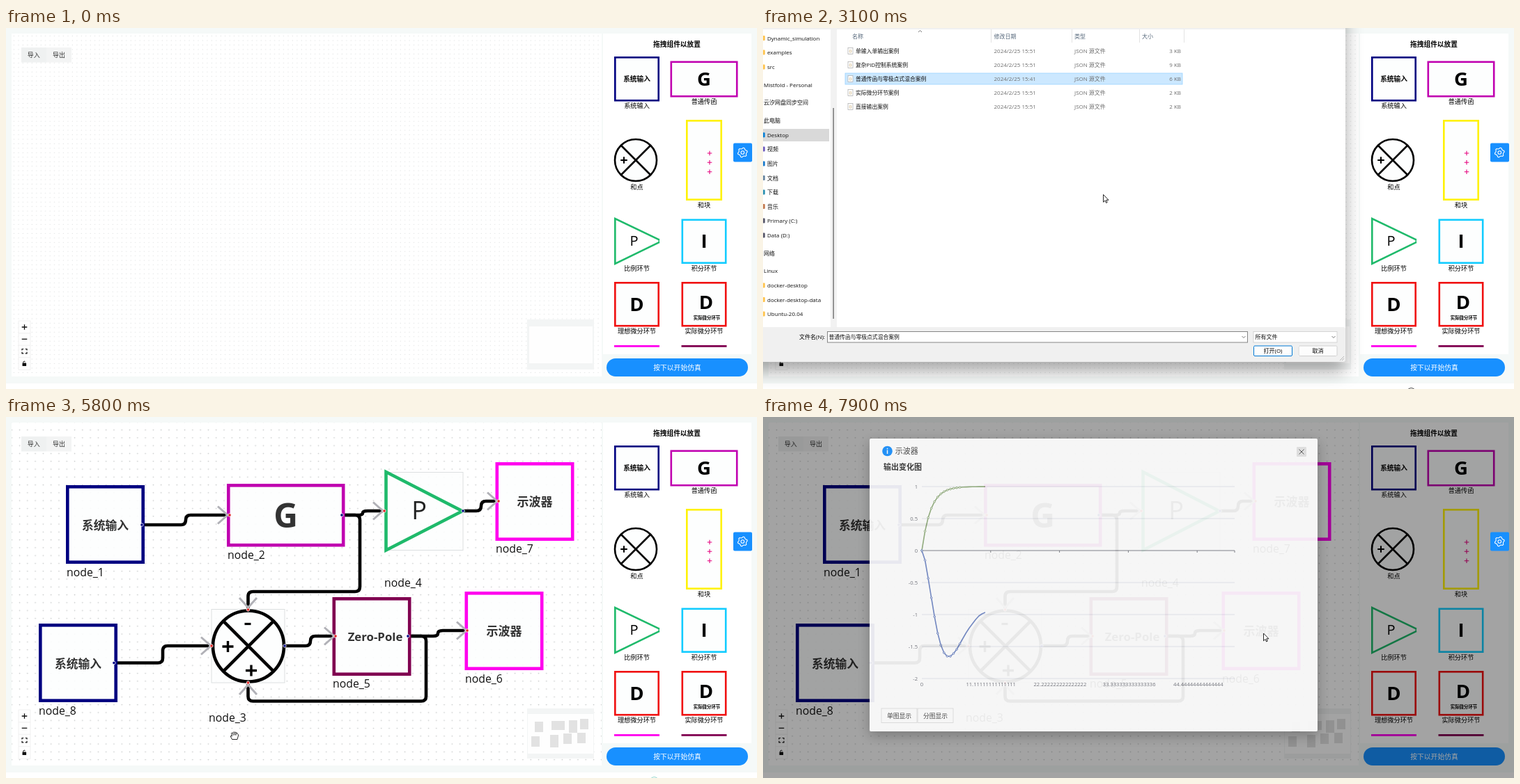
An HTML page for the animation above (8 s loop, 1078 by 519 pixels).

```html
<!DOCTYPE html>
<html lang="zh">
<head>
<meta charset="utf-8">
<style>
  html, body { margin: 0; width: 100%; height: 100%; overflow: hidden; background: #fff; }
  svg { display: block; font-family: "Open Sans", "Noto Sans CJK SC", "Noto Sans CJK", sans-serif; }
</style>
</head>
<body>
<svg id="stage" width="1078" height="519" viewBox="0 0 1078 519"></svg>
<script>
const LOOP = 8000, STEP = 100, FIT_AT = 5500, FIT_ZOOM = 1.75;
const NAVY = '#000080', PURPLE = '#c000b0', GREEN = '#1fba6b', PINK = '#ff00ee', PLUM = '#800050', BLUE = '#1890ff';

// Drawing helpers
const rect = (x, y, w, h, fill = 'none', more = '') =>
  `<rect x="${x}" y="${y}" width="${w}" height="${h}" fill="${fill}" ${more}/>`;
const path = (d, stroke, width = 1, more = '') =>
  `<path d="${d}" fill="none" stroke="${stroke}" stroke-width="${width}" ${more}/>`;
const circle = (x, y, r, fill, more = '') => `<circle cx="${x}" cy="${y}" r="${r}" fill="${fill}" ${more}/>`;
const text = (x, y, s, size, { fill = '#000', bold, anchor = 'middle' } = {}) =>
  `<text x="${x}" y="${y}" font-size="${size}" fill="${fill}" text-anchor="${anchor}"${bold ? ' font-weight="700"' : ''}>${s}</text>`;
const left = (x, y, s, size = 8, fill = '#111') => text(x, y, s, size, { fill, anchor: 'start' });
const group = (id, body, more = '') => `<g id="${id}" ${more}>${body}</g>`;
const frame = (x, y, w, h, color, s) =>
  rect(x + s / 2, y + s / 2, w - s, h - s, 'rgba(253,254,254,.9)', `stroke="${color}" stroke-width="${s}"`);
const plus = (x, y, r, color, width) => path(`M${x - r} ${y}h${2 * r}M${x} ${y - r}v${2 * r}`, color, width);
const bold = { bold: true }, inner = { bold: true, fill: '#333' };

function sumPoint(x, y, r, s) {
  const k = r * Math.SQRT1_2;
  return circle(x, y, r, '#fdfefe', `stroke="#000" stroke-width="${s}"`) +
    path(`M${x - k} ${y - k}l${2 * k} ${2 * k}M${x + k} ${y - k}l${-2 * k} ${2 * k}`, '#000', s);
}

function palette() {
  const label = (x, y, s) => text(x, y, s, 9.2);
  return rect(857, 8, 213, 461, '#fff') +
    text(963, 27, '拖拽组件以放置', 9.7, bold) +
    frame(873, 41, 65, 64.5, NAVY, 2.6) + text(905.5, 76.5, '系统输入', 9.7, bold) + label(905.5, 115, '系统输入') +
    frame(953.5, 47.5, 97, 52, PURPLE, 2.6) + text(1002, 83, 'G', 27.5, bold) + label(1002, 108.5, '普通传函') +
    sumPoint(904, 190, 30, 2.6) + plus(887, 190, 4.8, '#000', 2) + label(905.5, 232, '和点') +
    frame(976, 132, 52, 116, '#fff200', 2.6) +
    [180, 193.3, 206.7].map(y => plus(1010, y, 3.3, '#e6007e', 1.1)).join('') + label(1002, 257.5, '和块') +
    path('M938 304.7L874.3 274V339L938 307.8', GREEN, 2.6) + path('M937.3 304.5v4', GREEN, 1.4) +
    text(901.5, 313, 'P', 20) + label(905.5, 348.5, '比例环节') +
    frame(969.5, 274.5, 65, 64.5, '#12ccff', 2.6) + text(1002, 316, 'I', 27.5, bold) + label(1002, 348.5, '积分环节') +
    frame(873, 365, 65, 64.5, '#f01010', 2.6) + text(905.5, 407, 'D', 27.5, bold) + label(905.5, 439, '理想微分环节') +
    frame(969.5, 365, 65, 64.5, '#f01010', 2.6) + text(1005, 404, 'D', 27.5, bold) +
    text(1006, 418.5, '实际微分环节', 6.4, bold) + label(1002, 439, '实际微分环节') +
    rect(873, 456, 65, 2.8, PINK) + rect(969.5, 456, 65, 2.8, PLUM) +
    rect(862, 475, 203, 26, BLUE, 'id="start" rx="13"') +
    text(963.5, 492, '按下以开始仿真', 9.8, { fill: '#fff' });
}

function gear() {
  let d = '';
  for (let i = 0; i < 24; i++) {
    const a = (i + 0.5) * Math.PI / 12, r = i % 4 < 2 ? 6.9 : 5.5;
    d += (i ? 'L' : 'M') + (r * Math.sin(a)).toFixed(2) + ' ' + (-r * Math.cos(a)).toFixed(2);
  }
  return rect(1044, 165.5, 27, 27, BLUE, 'rx="2"') +
    `<g transform="translate(1057.3 179)">${path(d + 'Z', '#fff', 1.1)}${circle(0, 0, 2.3, 'none', 'stroke="#fff" stroke-width="1.1"')}</g>`;
}

// Orthogonal line with rounded corners
function wire(points, r = 7) {
  let d = `M${points[0]}`;
  for (let i = 1; i < points.length - 1; i++) {
    const [p, c, n] = [points[i - 1], points[i], points[i + 1]];
    const toward = q => {
      const len = Math.hypot(q[0] - c[0], q[1] - c[1]), k = Math.min(r, len / 2) / len;
      return [c[0] + (q[0] - c[0]) * k, c[1] + (q[1] - c[1]) * k];
    };
    d += `L${toward(p)}Q${c} ${toward(n)}`;
  }
  return path(d + `L${points[points.length - 1]}`, '#000', 4.6);
}
const step = (x1, y1, mid, y2, x2) => wire([[x1, y1], [mid, y1], [mid, y2], [x2, y2]]);
const arrow = (x, y, turn = 0) =>
  path('M-14 -12.5L0 0L-14 12.5', '#b1b1b7', 3, `transform="translate(${x} ${y}) rotate(${turn})"`);

function diagram() {
  const block = (x, y, w, h, color, s, size, dy) =>
    frame(x, y, w, h, color, 4.6) + text(x + w / 2, y + dy, s, size, inner);
  const ghost = (x, y, w, h) => rect(x, y, w, h, 'rgba(253,254,254,.9)', 'stroke="#dcdfe0"');
  const names = [[87, 228.5], [318, 203.5], [291, 438], [543, 243.5], [469, 389], [659, 381.5], [703, 194.5], [47, 427.5]];
  const dots = (list, color) => list.map(([x, y]) => circle(x, y, 2.2, color, 'stroke="#fff" stroke-width=".8"')).join('');
  return step(197, 155, 258, 141, 318) + step(485, 141, 512, 135, 541) + step(157, 353.5, 225, 329, 294) +
    step(400, 329, 437, 315, 471) + step(581, 315, 620, 307, 661) + step(657, 135, 682, 121, 705) +
    wire([[485, 141], [508, 141], [508, 251], [347.5, 251], [347.5, 275]]) +
    wire([[581, 315], [603, 315], [603, 408.5], [347.5, 408.5], [347.5, 384]]) +
    block(86, 98, 113, 113, NAVY, '系统输入', 16.8, 64) +
    block(317, 96, 169.5, 90.5, PURPLE, 'G', 48, 62.5) +
    ghost(544, 79.5, 112, 112) + path('M545.5 79V191.5L655 135.3Z', GREEN, 4.6) + text(593, 147, 'P', 36, { fill: '#222' }) +
    block(702.5, 65, 113, 113, PINK, '示波器', 17, 63) +
    block(658.5, 251, 113, 113, PINK, '示波器', 17, 63) +
    block(468.5, 259, 113, 113, PLUM, '', 17, 0) + text(530, 321.5, 'Zero-Pole', 16.8, inner) +
    ghost(295, 276.5, 105, 105.5) + sumPoint(348, 329.5, 51, 4.6) +
    plus(318.5, 330, 8, '#000', 3.4) + plus(352, 364.5, 8, '#000', 3.4) + path('M342.5 297.5h9', '#000', 3.2) +
    block(47, 297, 113, 113, NAVY, '系统输入', 16.8, 64) +
    arrow(318, 141) + arrow(541, 135) + arrow(294, 329) + arrow(471, 315) + arrow(661, 307) + arrow(705, 121) +
    arrow(347.5, 274, 90) + arrow(347.5, 385, -90) +
    dots([[321, 141], [543, 135], [295, 329], [473, 315], [662, 307], [707, 121], [347.5, 277], [347.5, 382]], '#e02020') +
    dots([[195, 155], [482, 141], [656, 135], [400, 329], [577, 315], [155, 353.5]], NAVY) +
    names.map(([x, y], i) => left(x, y, `node_${i + 1}`, 15.8, '#111')).join('');
}

function controls() {
  const K = '#111';
  return rect(18, 421, 17, 70.5, '#fefefe', 'stroke="#eee" stroke-width=".8"') +
    path('M18 438.8h17M18 456.2h17M18 473.7h17', '#eee', .8) +
    plus(26.5, 430, 3.8, K, 1.3) + path('M22.7 447.3h7.6', K, 1.3) +
    path('M23 463.5v-2h2.3M27.7 461.5H30v2M30 465.8v2h-2.3M25.3 467.8H23v-2', K, 1.2) +
    rect(23.5, 481.5, 5.6, 4.6, K, 'rx=".6"') + path('M24.8 481.5v-1.4q1.3-2 2.8-.3', K, 1);
}

function minimap() {
  const nodes = [[759, 438], [783, 437, 19, 13], [808, 436, 12, 18], [824, 434], [754, 459], [781, 457, 12, 18], [800, 455], [820, 454]];
  return rect(748, 419, 96, 72, '#f3f5f5') + rect(751, 429, 91, 53, '#fefefe', 'id="miniView"') +
    group('miniNodes', nodes.map(([x, y, w = 12, h = 15]) => rect(x, y, w, h, '#e2e2e2')).join(''));
}

function fileDialog() {
  const side = [['Dynamic_simulation', 17.5, 6, '#ffc95c'], ['examples', 38, 6, '#ffc95c'], ['src', 59, 6, '#ffc95c'],
    ['Mistfold - Personal', 84.5, 1, '#3c8fe0'], ['云汐网盘同步空间', 110, 1, '#8ab8e8'], ['此电脑', 136, 1, '#4a90d9'],
    ['Desktop', 156.8, 6, '#1f8ad6'], ['视频', 177, 6, '#7a6bc4'], ['图片', 198, 6, '#2f86d0'], ['文档', 218.5, 6, '#7590a8'],
    ['下载', 239, 6, '#3f9ab8'], ['音乐', 259.5, 6, '#c9865f'], ['Primary (C:)', 280, 6, '#667'], ['Data (D:)', 301, 6, '#667'],
    ['网络', 326.5, 1, '#4a90d9'], ['Linux', 352, 1, '#555'], ['docker-desktop', 373, 6, '#ffc95c'],
    ['docker-desktop-data', 393.5, 6, '#ffc95c'], ['Ubuntu-20.04', 414, 6, '#ffc95c']];
  const files = [['单输入单输出案例', '51', 3], ['复杂PID控制系统案例', '51', 9], ['普通传函与零极点式混合案例', '41', 6],
    ['实际微分环节案例', '51', 2], ['直接输出案例', '51', 2]];
  const grey = '#6d6d6d';
  const rows = files.map(([name, min, kb], i) => {
    const y = 36 + i * 20;
    return rect(122, y - 7.5, 7, 9, '#fff', 'stroke="#aaa" stroke-width=".7"') + text(125.5, y - .8, '{}', 5, { fill: '#b58a3a' }) +
      left(133, y, name, 7.8) + left(331.5, y, `2024/2/25 15:${min}`, 8, grey) + left(447, y, 'JSON 源文件', 8, grey) +
      text(600, y, kb + ' KB', 8, { fill: grey, anchor: 'end' });
  }).join('');
  const heads = [['名称', 128], ['修改日期', 331.5], ['类型', 447], ['大小', 544]]
    .map(([s, x]) => left(x, 15, s, 8, '#55677a')).join('');
  const caret = x => path(`M${x - 2.5} 443l2.5 2.5l2.5-2.5`, '#555', .8);
  return rect(-74, -126, 910, 606, '#fff', 'rx="5" filter="url(#windowShadow)"') +
    rect(-74, 430, 910, 50, '#f0f0f0', 'rx="3"') +
    rect(63, 439, 37, 12, '#fff') + rect(103, 437, 595, 15, '#fff') + rect(704, 437, 120, 15, '#fff') +
    rect(704, 457, 56, 15, '#fff') + rect(768, 457, 56, 15, '#fff') +
    group('dialogBody',
      rect(-74, -4, 910, 6, '#f0f0f0') + rect(97, 2, 9, 428, '#f2f2f2') + rect(100.3, 115, 1.7, 303, '#858585') +
      rect(-74, 145, 169, 18, '#d9d9d9') +
      side.map(([s, y, x, c]) => rect(x - 11, y - 6.5, 8, 7, c, 'rx="1"') + left(x, y, s)).join('') +
      path('M327.5 2v19M443.5 2v19M540.5 2v19M604.5 2v19', '#e3e3e3') + path('M223 6l2.5-2.5l2.5 2.5', '#555', .8) + heads +
      rect(118, 65, 484, 16, '#cce8ff', 'id="chosenRow" stroke="#99d1ff" stroke-width=".8"') + rows +
      rect(51, 437, 52, 15, '#f0f0f0') + text(89, 447, '文件名(N):', 8, { anchor: 'end' }) +
      rect(92.5, 436.5, 603, 15.5, '#fff', 'stroke="#858585"') + rect(696, 437, 3, 15, '#f0f0f0') + caret(690) +
      group('fileName', left(94.5, 447, '普通传函与零极点式混合案例', 7.8)) +
      rect(704, 436.5, 120, 15.5, '#fff', 'stroke="#ccc" stroke-width=".8"') + left(706.5, 447, '所有文件', 8) + caret(819) +
      rect(704.5, 457, 55, 14.5, '#fdfdfd', 'stroke="#0078d4" rx="1.5"') + text(732, 467, '打开(O)', 8) +
      rect(769, 457, 55, 14.5, '#fdfdfd', 'stroke="#d0d0d0" rx="1.5"') + text(796.5, 467, '取消', 8) +
      path('M828 478l6-6M831 478l3-3', '#aaa', .8));
}

function chart() {
  const yAxis = [1, .5, 0, -.5, -1, -1.5, -2], toY = v => 192 - 92 * v;
  const xAxis = ['0', '11.11111111111111', '22.222222222222222', '33.333333333333336', '44.44444444444444'];
  const dip = [192, 206, 232, 260, 287, 311, 328, 339, 344, 344, 340, 334, 326, 318, 310, 303, 297, 291, 286, 283, 281, 279.5, 279, 279];
  const sample = f => dip.map((_, i) => [228 + i * 4.55, f(i)]);
  const curve = (points, color) => path('M' + points.map(p => p.map(n => n.toFixed(1))).join('L'), color, 1.6, 'stroke-linejoin="round"') +
    points.slice(0, 13).map(([x, y]) => circle(x, y, 1.3, '#fff', `stroke="${color}"`)).join('');
  const grey = '#6e7079';
  return yAxis.map(v => path(`M228 ${toY(v)}H677`, v ? '#e0e3ea' : grey, .9) +
      text(222, toY(v) + 2.5, v, 7.6, { fill: grey, anchor: 'end' })).join('') +
    xAxis.map((s, i) => path(`M${228 + i * 98.8} 192v3`, grey, .9) + text(228 + i * 99.2, 386.5, s, 7.6, { fill: grey })).join('') +
    path('M677 192v3', grey, .9) +
    `<g clip-path="url(#reveal)">${curve(sample(i => toY(1 - Math.exp(-i * 4.55 / 12.6))), '#91ad7c')}${curve(sample(i => dip[i]), '#6f86c4')}</g>`;
}

function modal() {
  const button = (x, s) => rect(x, 419, 51, 20.5, '#fff', 'stroke="#d9d9d9" stroke-width=".8"') + text(x + 25.5, 432.7, s, 8.8, { fill: '#444' });
  return rect(153, 31, 643, 421, '#fff', 'rx="2" filter="url(#shadow)"') +
    circle(178.5, 49, 7.3, BLUE) + path('M178.5 47.5v5.5M178.5 44.8v1.5', '#fff', 1.5) +
    text(206.3, 53, '示波器', 11, { fill: '#444' }) + text(200.5, 75.5, '输出变化图', 11, inner) +
    rect(766, 43, 14, 14, '#e4e4e4', 'rx="1"') + path('M769.5 46.5l7 7M776.5 46.5l-7 7', '#555', 1) +
    chart() + button(170, '单图显示') + button(222, '分图显示');
}

const CURSORS = {
  arrow: 'M0 0V10.8L2.5 8.5L4.1 12L5.7 11.2L4.2 7.8H7.5Z',
  hand: 'M-1.2 1Q0-.6 1.2 1V5.3L5 6.2Q6.9 6.7 6.7 9L5.8 12.5V14.6H-1V12.8L-4.2 9.2Q-4.5 7.4-2.9 8L-1.2 9.6Z',
  grab: 'M-3.5 5.5L-5.8 1Q-5.4-.6-3.6 1L-4.4-3.4Q-3.2-5-2.2-3.2L-1.7-4.6Q-.4-6 .3-4.4Q1.8-6 2.4-3.8Q4.2-4.6 4.4-2.2Q5.8-2 5.5 0L4 5.5ZM-2.2-3.2L-1.6-.4M.3-4.4V-.6M2.4-3.8L2-.4'
};

const stage = document.getElementById('stage');
stage.innerHTML = `<defs>
  <pattern id="dots" width="6.45" height="6.45" patternUnits="userSpaceOnUse"><circle cx="3" cy="3" r=".5" fill="#c8cbcb"/></pattern>
  <filter id="shadow" x="-10%" y="-10%" width="120%" height="120%"><feDropShadow dx="0" dy="6" stdDeviation="9" flood-opacity=".28"/></filter>
  <filter id="windowShadow" x="-10%" y="-10%" width="120%" height="125%"><feDropShadow dx="0" dy="14" stdDeviation="12" flood-opacity=".34"/></filter>
  <clipPath id="pane"><rect x="8" y="8" width="847" height="493"/></clipPath>
  <clipPath id="reveal"><rect id="revealBox" x="222" y="80" width="0" height="310"/></clipPath></defs>` +
  rect(0, 0, 1078, 519, '#fff') + rect(0, 0, 1078, 511, '#f5f9f8') + rect(8, 8, 847, 493, '#fff') +
  rect(8, 8, 847, 493, 'url(#dots)') +
  `<g clip-path="url(#pane)">${group('flow', diagram())}</g>` +
  rect(22, 28, 36, 21.5, '#eff1f1', 'id="importBox"') + rect(58, 28, 36, 21.5, '#f3f4f4') +
  text(39.7, 42, '导入', 9, { fill: '#333' }) + text(76, 42, '导出', 9, { fill: '#333' }) +
  controls() + minimap() + palette() +
  circle(930.5, 523, 5.5, 'none', 'id="peek" stroke-width="1.2"') +
  group('dialog', fileDialog()) +
  rect(0, 0, 1078, 519, '#000', 'id="mask"') + group('modal', modal()) + gear() +
  '<path id="cursor" fill="#fff" stroke="#111" stroke-width=".9" stroke-linejoin="round"/>';

const $ = id => document.getElementById(id);
const show = (id, on) => $(id).setAttribute('visibility', on ? 'visible' : 'hidden');
const set = (id, attrs) => Object.entries(attrs).forEach(([k, v]) => $(id).setAttribute(k, v));

// Piecewise linear track: rows of [time, ...values]
function track(rows, t) {
  let i = 0;
  while (i < rows.length - 1 && rows[i + 1][0] <= t) i++;
  const a = rows[i], b = rows[i + 1] || a;
  const k = b === a ? 0 : Math.max(0, (t - a[0]) / (b[0] - a[0]));
  return a.slice(1).map((v, j) => typeof v === 'number' ? v + (b[j + 1] - v) * k : v);
}

const pointer = [
  [100, 420, 220, 'grab'], [200, 180, 110, 'grab'], [300, 70, 58, 'hand'], [400, 30, 36, 'hand'], [500, 30, 36, 'hand'],
  [700, 42, 38, 'hand'], [1000, 42, 38, 'hand'], [1200, 42, 33.5, 'arrow'], [1900, 42, 33.5, 'arrow'], [2700, 196, 72, 'arrow'],
  [2900, 220, 78, 'arrow'], [3100, 488.5, 239.5, 'arrow'], [3600, 742, 464, 'arrow'], [3900, 745.5, 466.5, 'hand'],
  [4200, 745.5, 466.5, 'hand'], [4300, 745, 466, 'grab'], [4600, 536, 144, 'grab'], [5300, 25, 463, 'hand'], [5600, 25, 463, 'hand'],
  [5700, 150, 460, 'grab'], [5800, 328, 458, 'grab'], [6100, 800, 476, 'grab'], [6200, 930, 482, 'hand'], [6300, 1045, 488, 'hand'],
  [6700, 893, 475, 'hand'], [6900, 893, 475, 'hand'], [7000, 820, 420, 'grab'], [7200, 672, 264, 'hand'],
  [7500, 718.5, 311, 'hand'], [7700, 718.5, 311, 'arrow']];
// time, offset x, offset y, scale, opacity
const dialogMotion = [[1600, 26, 12, .91, .2], [1700, 17.3, 8, .933, .64], [1800, 5, 2, .983, .93], [1900, 0, 0, 1, 1],
  [4000, 0, 0, 1, 1], [4100, 9, 4, .977, .5], [4200, 18.3, 8.5, .952, .08], [4300, 20, 9, .95, 0]];
// time, scale, opacity, dimming of the page
const modalMotion = [[7600, .2, 0, 0], [7700, .7, .25, .12], [7800, .95, .65, .24], [7900, 1, .91, .36]];

function draw(t) {
  const [x, y, kind] = track(pointer, t);
  show('cursor', t >= 100);
  set('cursor', { d: CURSORS[kind], transform: `translate(${x} ${y})` });

  const fitted = t >= FIT_AT, loaded = t >= 4400;
  show('flow', loaded);
  show('miniNodes', loaded);
  set('flow', { transform: fitted ? '' : `translate(184 108) scale(${1 / FIT_ZOOM})` });
  set('dots', { patternTransform: fitted ? `translate(3 2) scale(${FIT_ZOOM})` : 'translate(2 2)' });
  set('miniView', fitted ? { x: 749, y: 427, width: 94, height: 57 } : { x: 751, y: 429, width: 91, height: 53 });

  set('importBox', { fill: t >= 300 && t < 4600 ? '#e5e8e8' : '#eff1f1' });
  set('start', { fill: t >= 6200 && t < 7000 ? '#40a9ff' : BLUE });
  show('peek', t >= 100 && t < 7300);
  set('peek', { stroke: t < 3700 ? '#555' : '#9ad8cf' });

  const [dx, dy, ds, alpha] = track(dialogMotion, t);
  show('dialog', t >= 1600 && t < 4300);
  set('dialog', { transform: `translate(${dx} ${dy}) scale(${ds})`, opacity: alpha });
  set('dialogBody', { opacity: t < 1900 ? 0 : 1 });
  set('chosenRow', { opacity: t >= 2800 ? 1 : t >= 2600 ? .45 : 0 });
  set('fileName', { opacity: t >= 2800 ? 1 : 0 });

  const [ms, mAlpha, dim] = track(modalMotion, t);
  show('modal', t >= 7700);
  set('modal', { opacity: mAlpha, transform: `translate(${718 * (1 - ms)} ${311 * (1 - ms)}) scale(${ms})` });
  set('mask', { opacity: t >= 7700 ? dim : 0 });
  set('revealBox', { width: t >= 7900 ? 97 : 0 });
}

const start = performance.now();
function tick() {
  const t = (performance.now() - start) % LOOP;
  draw(Math.floor(t / STEP) * STEP);
  requestAnimationFrame(tick);
}
tick();
</script>
</body>
</html>
```
